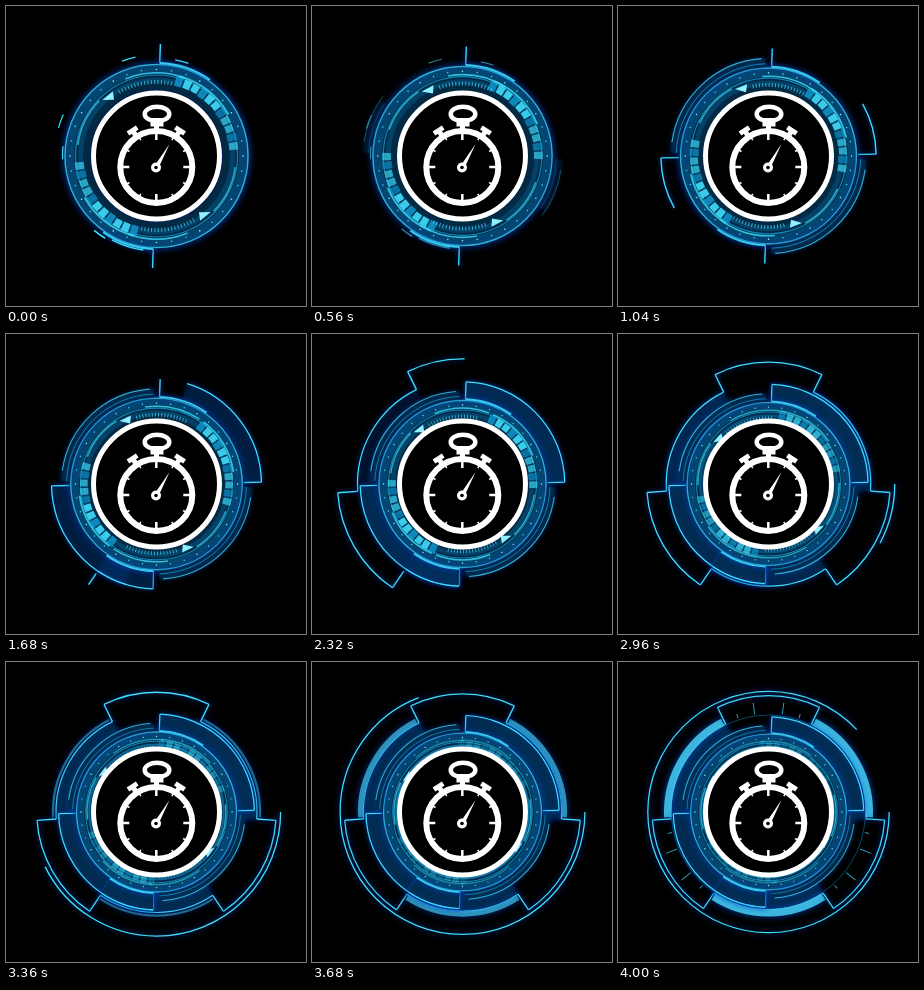
An HTML page with a canvas for the animation above (4080 ms loop, 300 by 300 pixels).

```html
<!DOCTYPE html>
<html lang="en">
<head>
<meta charset="utf-8">
<title>Stopwatch dial</title>
<style>
  html, body { margin: 0; width: 100%; height: 100%; overflow: hidden; background: #000; }
  canvas { display: block; width: 100vw; height: 100vh; }
</style>
</head>
<body>
<canvas id="stage" width="300" height="300"></canvas>
<script>
const ctx = document.getElementById('stage').getContext('2d');
const LOOP = 4080, STEP = 80, DEG = Math.PI / 180;
const CYAN = '#3fdcfa', BLUE = '#0f8fc4', DEEP = '#07507c', SHADE = '#04283c', PALE = '#8ff0ff';

// [time, value] tables
const TURN = [[0, 0], [500, 11], [1040, 17.5], [1360, 18], [1680, 13.5], [2320, .5], [2960, -9], [4080, -24]];
const QUARTER = [[640, 0], [1040, 28], [1680, 72], [1920, 87]];
const TABS = [[1600, 0], [1680, 4], [2000, 70], [2320, 153], [2640, 260], [2900, 366]];
const RIM = [[2840, 0], [2960, 28], [3320, 142], [3680, 249], [4000, 317], [4080, 332]];

function at(table, t) {
  if (t <= table[0][0]) return table[0][1];
  for (let i = 1; i < table.length; i++) {
    const [t0, v0] = table[i - 1], [t1, v1] = table[i];
    if (t <= t1) return v0 + (v1 - v0) * (t - t0) / (t1 - t0);
  }
  return table[table.length - 1][1];
}
const ramp = (t, from, to) => Math.min(1, Math.max(0, (t - from) / (to - from)));
const polar = (r, deg) => [r * Math.cos(deg * DEG), r * Math.sin(deg * DEG)];

function stroke(width, color, alpha = 1, glow = 0) {
  ctx.globalAlpha = alpha;
  ctx.lineWidth = width;
  ctx.strokeStyle = color;
  ctx.shadowBlur = glow;
  ctx.shadowColor = '#0048c0';
  ctx.stroke();
  ctx.globalAlpha = 1;
  ctx.shadowBlur = 0;
}
function arc(r, from, to, width, color, alpha, glow) {
  ctx.beginPath();
  ctx.arc(0, 0, r, from * DEG, to * DEG);
  stroke(width, color, alpha, glow);
}
function spoke(deg, r0, r1, width, color, alpha, glow) {
  ctx.beginPath();
  ctx.moveTo(...polar(r0, deg));
  ctx.lineTo(...polar(r1, deg));
  stroke(width, color, alpha, glow);
}
function rotated(deg, draw) {
  ctx.save();
  ctx.rotate(deg * DEG);
  draw();
  ctx.restore();
}
const twice = draw => [0, 180].forEach(deg => rotated(deg, draw));

function rings(t) {
  const late = ramp(t, 2600, 3700);
  arc(79, 0, 360, 25, SHADE, .9, 9);
  arc(86.5, 0, 360, 8, DEEP, .75);
  arc(76, 0, 360, 5, DEEP, .6);
  arc(81, 0, 360, 1.2, BLUE, .9);
  arc(91.5, 0, 360, 1.5, CYAN, .75, 6);
  if (late) arc(77, 0, 360, 2, BLUE, .7 * late);

  // the blocks follow the hatched ring with a short lag
  const turn = at(TURN, t), lagged = 1.2 * at(TURN, t - 300);
  rotated(lagged, () => twice(() => {
    for (let i = 0; i < 11; i++) {
      const a = -76 + i * 6.6;
      arc(77.5, a, a + 5.4, 10 - i % 3, i % 3 ? CYAN : BLUE, (i < 6 ? .9 : .65) * (1 - .65 * late));
    }
    arc(83, -74, -30, 2, CYAN, .8 - .4 * late);
  }));
  rotated(turn, () => twice(() => {
    for (let a = -120; a < -78; a += 2.6) spoke(a, 72, 76, .9, CYAN, .8);
    arc(83, -112, -70, 1.6, CYAN, .8 - .4 * late);
    arc(79.5, 8, 44, 1.6, CYAN, .7);
    ctx.fillStyle = PALE;
    ctx.beginPath();
    ctx.moveTo(...polar(78, -134));
    ctx.lineTo(...polar(78, -124));
    ctx.lineTo(...polar(70.5, -127));
    ctx.fill();
  }));

  for (let a = 0; a < 360; a += 10) {
    ctx.fillStyle = a % 30 ? CYAN : PALE;
    ctx.beginPath();
    ctx.arc(...polar(86.5, a), .8, 0, 7);
    ctx.fill();
  }
  const grown = ramp(t, 300, 1000);
  twice(() => {
    arc(93, -88, -55, 2, CYAN, .9, 5);
    if (!grown) return;
    arc(97, -178, -178 + 86 * grown, 9, SHADE, .7 * grown, 5);
    arc(101.5, -172, -172 + 78 * grown, 1.2, CYAN, .75 * grown);
    arc(96, -178, -178 + 86 * grown, 1, BLUE, .9 * grown);
  });

  // loose dashes left of the opening build-up
  const fade = 1 - ramp(t, 300, 900);
  if (fade) {
    arc(101, -110, -102, 1.2, CYAN, fade);
    arc(98, -79, -71, 1.2, CYAN, fade);
    arc(102, 196, 204, 1.2, CYAN, fade);
    arc(94, 178, 186, 1.2, CYAN, fade);
    arc(97, 122, 130, 1.6, CYAN, fade);
    arc(95, 98, 118, 1.6, CYAN, fade);
  }
}

function quarters(t) {
  const sweep = at(QUARTER, t), side = ramp(t, 640, 880);
  const fill = ramp(t, 1000, 2600);
  twice(() => {
    if (fill) arc(102, -1 - sweep, -1, 19, SHADE, .8 * fill, 5);
    spoke(-88, 93, 112, 1.4, CYAN, 1, 5);
    if (side) spoke(-1, 112 - 19 * side, 112, 1.4, CYAN, 1, 5);
    if (sweep) arc(112, -1 - sweep, -1, 1.4, CYAN, 1, 5);
  });
  // the lower quarter also closes from its far end
  const closing = ramp(t, 1200, 1680);
  if (closing) {
    arc(102, 92, 92 + 32 * closing, 19, SHADE, .8 * fill, 5);
    arc(112, 92, 92 + 32 * closing, 1.4, CYAN, 1, 5);
  }
}

function tabs(t) {
  const JOG = 6, SPAN = 52;
  const sweep = at(TABS, t);
  if (!sweep) return;
  const fill = ramp(t, 2000, 3300), band = ramp(t, 3300, 4000), ticks = ramp(t, 3680, 4000);
  for (let i = 0; i < 3; i++) {
    const start = 124 + i * 120, left = sweep - i * 120;
    if (left <= 0) break;
    const drawn = left - JOG;
    if (drawn > SPAN) {
      const end = start + Math.min(drawn, 120);
      arc(104, start + SPAN, end, 20, SHADE, .8 * fill, 7);
      arc(115, start + SPAN, end, 1.4, CYAN, 1, 6);
      if (band) arc(118.5, start + SPAN + 1, start + 119, 2 + 7 * band, '#43c5e8', .45 + .45 * band, 7);
    }
    spoke(start, 115, 115 + 22 * Math.min(1, left / JOG), 1.5, CYAN, 1, 5);
    if (drawn > 0) arc(137, start, start + Math.min(drawn, SPAN), 1.5, CYAN, 1, 6);
    if (drawn >= SPAN) spoke(start + SPAN, 115, 137, 1.5, CYAN, 1, 5);
    if (ticks) {
      arc(114, start, start + SPAN, 1, BLUE, .6 * ticks);
      for (const d of [-18, -8, 8, 18]) {
        spoke(start + SPAN / 2 + d, 116, Math.abs(d) < 10 ? 130 : 121, 1.2, CYAN, .7 * ticks);
      }
    }
  }
}

function rim(t) {
  const sweep = at(RIM, t);
  if (sweep) arc(142, 0, sweep, 1.5, CYAN, 1, 6);
}

function stopwatch() {
  const ring = (x, y, rx, ry, w) => {
    ctx.beginPath();
    ctx.ellipse(x, y, rx, ry, 0, 0, 7);
    stroke(w, '#fff');
  };
  const dot = (x, y, r, color) => {
    ctx.fillStyle = color;
    ctx.beginPath();
    ctx.arc(x, y, r, 0, 7);
    ctx.fill();
  };
  dot(150.5, 150, 64, '#000');
  ring(150.5, 150, 63, 63, 5);

  ring(151, 108, 12.3, 7.3, 4.5);
  ctx.fillStyle = '#fff';
  ctx.fillRect(144.5, 112, 13, 8.5);
  ctx.fillRect(148, 119, 5, 6);
  ring(150.3, 161, 36, 36, 6);

  ctx.save();
  ctx.translate(150.3, 161);
  for (const deg of [-33, 33]) rotated(deg, () => {
    ctx.fillRect(-5.5, -46, 11, 5);
    ctx.fillRect(-2.5, -42, 5, 5);
  });
  for (let a = 0; a < 360; a += 30) {
    if (a % 90) spoke(a, 31, 34, 1.5, '#fff');
    else spoke(a, 27, 34, 2.5, '#fff');
  }
  ctx.restore();

  ctx.beginPath();
  ctx.moveTo(148.5, 160);
  ctx.lineTo(163.5, 138);
  ctx.lineTo(152.5, 162);
  ctx.fill();
  dot(150, 161.5, 5, '#fff');
  dot(150, 161.5, 1.8, '#000');
}

function draw(t) {
  const scale = 1 - .15 * t / 4000;
  ctx.fillStyle = '#000';
  ctx.fillRect(0, 0, 300, 300);
  ctx.save();
  ctx.translate(150.5, 150);
  ctx.scale(scale, scale);
  tabs(t);
  quarters(t);
  rings(t);
  rim(t);
  ctx.restore();
  stopwatch();
}

const begin = performance.now();
function frame() {
  const t = (performance.now() - begin) % LOOP;
  draw(Math.floor(t / STEP) * STEP);
  requestAnimationFrame(frame);
}
frame();
</script>
</body>
</html>
```
